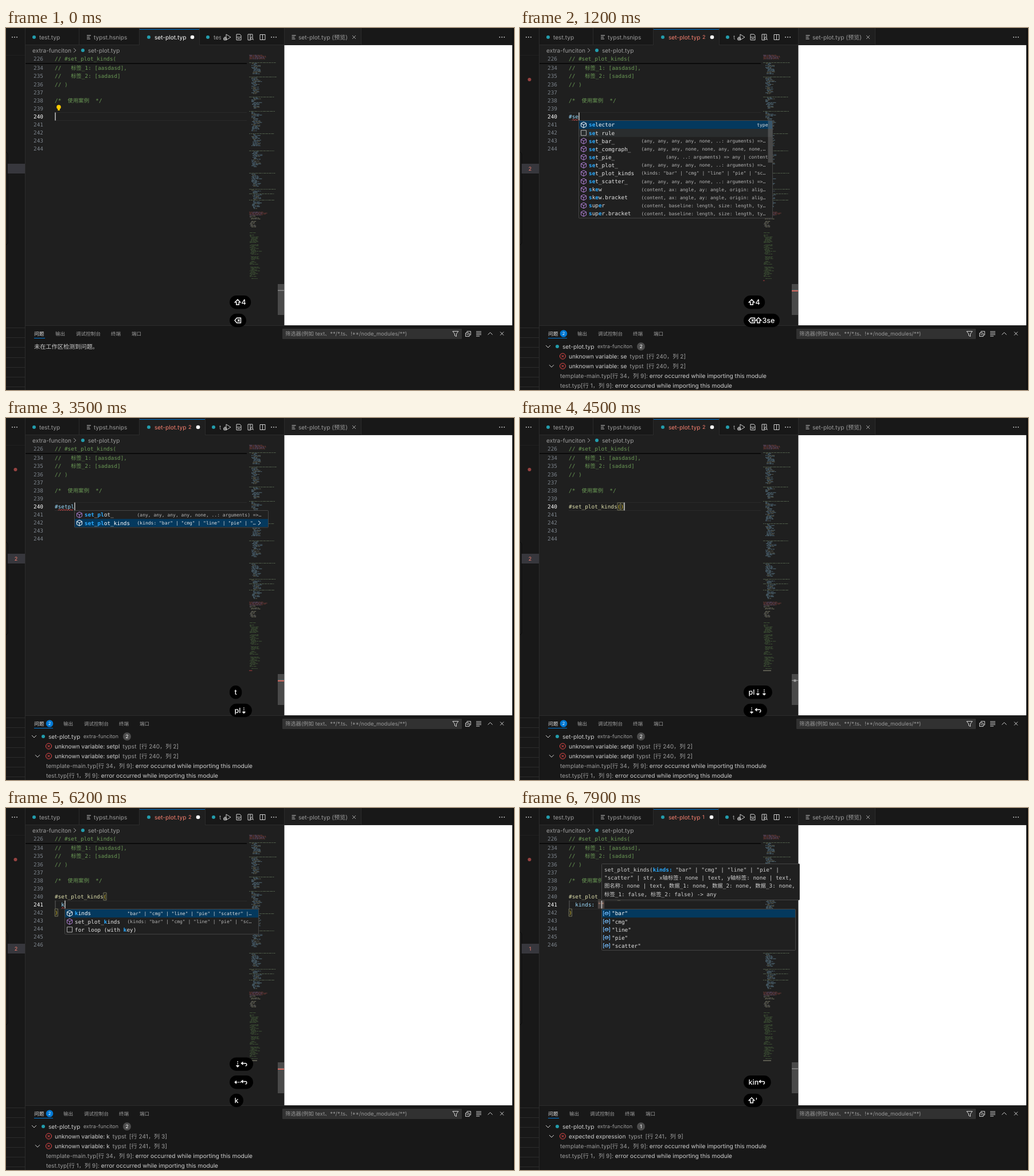
Recreate the animation shown at these times as an HTML page with a canvas. Size 886 by 632 pixels, loop 8 s.

```html
<!DOCTYPE html>
<html lang="zh-CN">
<head>
<meta charset="utf-8">
<style>
html, body { margin: 0; width: 100%; height: 100%; overflow: hidden; background: #181818; }
canvas { display: block; }
</style>
</head>
<body>
<canvas id="stage" width="886" height="632"></canvas>
<script>
const ctx = document.getElementById('stage').getContext('2d');
ctx.textRendering = 'geometricPrecision';
const LOOP = 8000, CHAR = 5.65, LEFT = 85, ROW = 14.08;
const MONO = '"DejaVu Sans Mono","Noto Sans CJK SC","Noto Sans CJK",monospace';
const SANS = 'Inter,"Noto Sans CJK SC","Noto Sans CJK",sans-serif';
const TEAL = '#239dad', RED = '#f14c4c', SALMON = '#f88070', GRAY = '#9d9d9d', LIGHT = '#d0d0d0';

// ---- drawing helpers ----
function text(s, x, cy, color, size = 10.15, family = SANS, align = 'left', weight = '') {
  ctx.font = `${weight} ${size}px ${family}`;
  ctx.textAlign = align;
  ctx.fillStyle = color;
  ctx.fillText(s, x, cy + size * 0.36);
  return x + ctx.measureText(s).width;
}
const code = (s, x, cy, color, weight) => text(s, x, cy, color, 9.4, MONO, 'left', weight);
function box(x, y, w, h, fill, stroke, radius = 0) {
  ctx.beginPath();
  ctx.roundRect(x, y, w, h, radius);
  if (fill) { ctx.fillStyle = fill; ctx.fill(); }
  if (stroke) { ctx.strokeStyle = stroke; ctx.lineWidth = 1; ctx.stroke(); }
}
function disc(x, y, r, color) {
  ctx.beginPath();
  ctx.arc(x, y, r, 0, 7);
  ctx.fillStyle = color;
  ctx.fill();
}
function icon(d, x, y, color = LIGHT, width = 1) {
  ctx.save();
  ctx.translate(x, y);
  ctx.strokeStyle = color;
  ctx.lineWidth = width;
  ctx.stroke(new Path2D(d));
  ctx.restore();
}
function dots(x, y) { for (const dx of [-4, 0, 4]) disc(x + dx, y, 0.9, LIGHT); }

const ICON = {
  lines: 'M-3.5-3H3.5M-3.5 0H1.5M-3.5 3H2.5',
  close: 'M-3-3L3 3M3-3L-3 3',
  right: 'M-2-3.5L2 0L-2 3.5',
  down: 'M-4-2L0 2L4-2',
  up: 'M-4 2L0-2L4 2',
  run: 'M-2-5L6 0L-2 5V-5M-6 1H-2V5H-6ZM-7 3H-1M-4-1V1',
  file: 'M-4-5H2L4-3V5H-4ZM-4 0H4M-2 2.5H2',
  preview: 'M-5-5H3V0M0 5H-5V-5M-1-5V5M5 5L3 3M3.5 2A2 2 0 1 1-.5 2A2 2 0 1 1 3.5 2',
  split: 'M-4.5-4.5H4.5V4.5H-4.5ZM0-4.5V4.5',
  funnel: 'M-5-4.5H5L1.5 0V4.5L-1.5 3V0Z',
  collapse: 'M-4.5-1.5H2V4.5H-4.5ZM-2-1.5V-4.5H4.5V2H2M-3 1.5H.5',
  cube: 'M0-5L4.5-2.7V2.7L0 5L-4.5 2.7V-2.7ZM-4.5-2.7L0 0L4.5-2.7M0 0V5',
  snippet: 'M-4.5-4.5H4.5V4.5H-4.5Z',
  value: 'M-4-4H-5.5V4H-4M4-4H5.5V4H4M-3-1L0-2.5L3-1.5V1L0 2.5L-3 1.5ZM-3-1L0 0L3-1.5'
};

// ---- timeline ----
const pick = (t, steps) => steps.reduce((value, [start, next]) => t >= start ? next : value, steps[0][1]);

const FIRST = [[0, ''], [100, '#'], [400, '#s'], [800, '#se'], [1900, '#set'], [2900, '#setp'], [3000, '#setpl'],
  [4300, '#set_plot_kinds()'], [5200, '#set_plot_kinds(']];
const SECOND = [[0, ''], [6100, 'k'], [6300, 'ki'], [6500, 'kin'], [6800, 'kinds: '], [7600, 'kinds: ""']];
const PROBLEMS = [[0, null], [900, ['unknown variable: se', 240, 2, 2]], [2200, ['expected identifier', 240, 5, 2]],
  [3300, ['unknown variable: setpl', 240, 2, 2]], [4700, null], [6200, ['unknown variable: k', 241, 3, 2]],
  [6700, ['unknown variable: kin', 241, 3, 2]], [7200, ['expected expression', 241, 9, 1]]];
const BUBBLES = [
  [[-300, '⇧4']],
  [[-200, '⌫'], [100, '⌫⇧3'], [400, '⌫⇧3s'], [800, '⌫⇧3se']],
  [[1900, 't']],
  [[2900, 'p'], [3000, 'pl'], [3400, 'pl⇣'], [3700, 'pl⇣⇣']],
  [[4000, '⇣'], [4300, '⇣↩']],
  [[5000, '⇠'], [5200, '⇠↩']],
  [[6100, 'k'], [6300, 'ki'], [6500, 'kin'], [6800, 'kin↩']],
  [[7500, '⇧'], [7600, "⇧'"]]
];
const PRESSES = BUBBLES.flat().map(step => step[0]);

// ---- completion lists: label, detail ----
const SIG = '(any, any, any, any, none, ..: arguments) =>…';
const KINDS = '(kinds: "bar" | "cmg" | "line" | "pie" | "sc…';
const SET_ITEMS = [['set_bar_', SIG], ['set_comgraph_', '(any, any, any, none, none, any, none, none,…'],
  ['set_pie_', '(any, ..: arguments) => any | content'], ['set_plot_', SIG], ['set_plot_kinds', KINDS], ['set_scatter_', SIG]];
const SKEW = '(content, ax: angle, ay: angle, origin: alig…';
const SUPER = '(content, baseline: length, size: length, ty…';
const STRIKE = '(content, background: bool, extent: length, …';
const LISTS = {
  s: [['selector', 'type'], ['set rule', ''], ...SET_ITEMS, ['skew', SKEW], ['skew.bracket', SKEW], ['super', SUPER], ['super.bracket', SUPER]],
  set: [['set rule', 'Sets style properties on an element.'], ...SET_ITEMS, ['selector', 'type'], ['state', 'type'],
    ['strike', STRIKE], ['strike.bracket', STRIKE], ['stroke', 'type']],
  setpl: [['set_plot_', SIG], ['set_plot_kinds', KINDS]],
  k: [['kinds', '"bar" | "cmg" | "line" | "pie" | "scatter" |…'], ['set_plot_kinds', KINDS], ['for loop (with key)', '']],
  quote: ['bar', 'cmg', 'line', 'pie', 'scatter'].map(kind => [`"${kind}"`, ''])
};
const POPUPS = [[0, ''], [500, 's'], [1900, 'set'], [2900, 'setpl'], [4300, ''], [6100, 'k'], [6800, ''], [7700, 'quote']];

function matches(label, query) {
  const find = q => {
    const found = [];
    for (let i = 0; i < label.length; i++) if (label[i] === q[found.length]) found.push(i);
    return found.length === q.length ? found : null;
  };
  const swapped = query[0] + [...query.slice(1)].reverse().join('');
  return find(query) || find(swapped) || [];
}

// ---- minimap ----
let seed = 7;
const random = () => (seed = seed * 16807 % 2147483647) / 2147483647;
const minimap = [];
const MINI_COLORS = { i: ['#c586c0', '#ce5a50'], f: ['#9cdcfe', '#7fb4d8', '#9cdcfe', '#b5b590'], g: ['#6a9955'], y: ['#b8b8b8', '#dcdcaa'] };
function miniBlock(top, bottom, kind) {
  const colors = MINI_COLORS[kind];
  for (let y = top, n = 0; y < bottom; y += 1.62, n++) {
    const head = n === 0 && kind === 'f';
    const indent = head || kind === 'i' ? n % 2 : kind === 'f' ? 4 + Math.floor(random() * 5) : 1 + Math.floor(random() * 4);
    const end = head ? 44 : kind === 'i' ? 22 + random() * 9 : indent + 3 + random() * 11;
    for (let x = indent; x < end;) {
      const w = 1.5 + random() * 4;
      minimap.push([424 + x, y, Math.min(w, 48 - x), head ? '#8fae83' : colors[Math.floor(random() * colors.length)]]);
      x += w + 0.9;
    }
  }
}
[[47, 55, 'i'], [60, 81, 'f'], [85, 115, 'f'], [120, 141, 'f'], [145, 180, 'f'], [184, 206, 'f'], [214, 242, 'f'],
  [253, 277, 'f'], [281, 288, 'f'], [289, 299, 'f'], [300, 315, 'f'], [321, 326, 'i'], [328, 333, 'y'], [337, 348, 'y'],
  [357, 358, 'g'], [361, 375, 'g'], [378, 395, 'g'], [399, 404, 'g'], [407, 412, 'g'], [417, 434, 'g'], [437, 438, 'g']]
  .forEach(block => miniBlock(...block));

// ---- parts ----
const lineY = n => 70 + (n - 234) * ROW;

function drawSidebar(problem) {
  box(0, 0, 33, 632, '#181818');
  dots(15, 16);
  box(0, 47, 33, 1, '#202020');
  box(-8, 216, 11, 163, '#1b1b1b', '#0a0a0a', 5);
  box(3, 237, 30, 17, '#37373d');
  for (let y = 523; y < 632; y += 17.2) box(0, Math.round(y), 33, 1, '#2b2b2b');
  box(33, 0, 1, 632, '#2b2b2b');
  if (!problem) return;
  disc(16.5, 90, 3, '#964341');
  text(problem[3], 17.5, 245.5, SALMON, 9, SANS, 'center');
}

function drawTabs(problem) {
  const end = problem ? (problem[3] === 2 ? 347 : 346) : 337;
  box(34, 0, 852, 30, '#181818');
  box(34, 29, 852, 1, '#2b2b2b');
  disc(49, 16, 3, TEAL);
  text('test.typ', 58, 16, GRAY);
  icon(ICON.lines, 144.5, 16, LIGHT);
  text('typst.hsnips', 153, 16, GRAY);
  for (const x of [127, 232, end]) box(x, 0, 1, 30, '#2b2b2b');
  box(233, 2, end - 233, 28, '#1f1f1f');
  box(233, 2, end - 233, 1, '#0078d4');
  disc(249, 16, 3, TEAL);
  text('set-plot.typ', 259, 16, problem ? SALMON : '#ffffff');
  if (problem) text(problem[3], 318, 16, SALMON, 9);
  disc(end - 12, 16, 3.3, '#ffffff');
  disc(end + 15, 16, 3, TEAL);
  ctx.save();
  ctx.beginPath();
  ctx.rect(end, 0, 375 - end, 29);
  ctx.clip();
  text('test', end + 25, 16, GRAY);
  ctx.restore();
  icon(ICON.run, 386, 16);
  icon(ICON.file, 406, 16);
  icon(ICON.preview, 427, 16);
  icon(ICON.split, 447.5, 16);
  dots(467, 16);

  box(485, 0, 1, 519, '#2b2b2b');
  box(486, 0, 133, 30, '#1f1f1f');
  box(619, 0, 1, 30, '#2b2b2b');
  icon(ICON.lines, 502, 16);
  text('set-plot.typ (预览)', 510, 16, GRAY);
  icon(ICON.close, 607, 16, GRAY);
  dots(865, 16);
  box(485.5, 30, 397.5, 489, '#ffffff');
  box(883, 0, 3, 632, '#111111');
}

function squiggle(x1, x2, y) {
  let d = `M${x1} ${y}`;
  for (let x = x1 + 2, up = true; x <= x2; x += 2, up = !up) d += `L${x} ${y + (up ? -2 : 0)}`;
  icon(d, 0, 0, RED, 1);
}

function drawEditor(t, problem) {
  const first = pick(t, FIRST), second = pick(t, SECOND);
  const accepted = t >= 4300, split = t >= 5200, quoted = second.endsWith('"');
  const active = split ? 241 : 240, y = lineY(active), last = split ? 246 : 244;
  box(34, 30, 451, 489, '#1f1f1f');
  text('extra-funciton', 46, 39, GRAY);
  icon(ICON.right, 120, 39, GRAY);
  disc(134, 39, 3, TEAL);
  text('set-plot.typ', 143, 39, GRAY);

  for (const edge of [-7, 7]) box(LEFT, Math.round(y + edge), 335, 1, '#2a2a2a');
  if (split) box(LEFT + 0.5, y - 7, 1, ROW, '#606060');
  const comment = (s, cy) => code(s, LEFT, cy, '#6a9955');
  comment('// #set_plot_kinds(', 54);
  comment('//   标签_1: [aasdasd],', lineY(234));
  comment('//   标签_2: [sadasd]', lineY(235));
  comment('// )', lineY(236));
  comment('/*  使用案例  */', lineY(238));
  box(34, 61, 386, 2, '#0b0b0b');
  const number = (n, cy) => text(n, 65, cy, n === active ? '#ffffff' : '#7c838b', 9.4, MONO, 'right');
  number(226, 54);
  for (let n = 234; n <= last; n++) number(n, lineY(n));

  if (t < 100) {
    disc(92, 138, 3.8, '#ffcc00');
    box(90.3, 141, 3.4, 3, '#ffcc00');
  }

  const bracket = (ch, column, cy) => {
    const x = LEFT + column * CHAR;
    box(x + 0.2, cy - 6.5, 5.2, 13, null, '#77775c');
    code(ch, x, cy, '#e0c830');
  };
  const y0 = lineY(240);
  if (accepted) {
    code('#set_plot_kinds', LEFT, y0, '#dcdcaa');
    bracket('(', 15, y0);
    split ? bracket(')', 0, lineY(242)) : bracket(')', 16, y0);
  } else {
    code(first, LEFT, y0, first === '#set' ? '#c586c0' : '#9cdcfe');
  }
  if (quoted) box(LEFT + 9 * CHAR, y - 7, 2 * CHAR, 14, '#4b4442');
  code(second.replace(/".*/, ''), LEFT + 2 * CHAR, y, '#9cdcfe');
  if (quoted) code('""', LEFT + 9 * CHAR, y, '#ce9178');

  if (problem && !accepted) {
    const missing = problem[0].startsWith('expected');
    squiggle(missing ? 104 : 91, missing ? 111 : LEFT + first.length * CHAR, y0 + 7);
  }
  if (problem && split && t < 6800) squiggle(97, LEFT + (2 + second.length) * CHAR, y + 7);

  let column = split ? 2 + second.length : first.length;
  if (t >= 5000 && !split || quoted) column--;
  const caret = LEFT + column * CHAR;
  const pressed = Math.max(...PRESSES.filter(p => p <= t));
  if ((t - pressed) % 1000 < 550) box(caret + 0.3, y - 7, 1.4, 14, '#d0d0d0');

  ctx.globalAlpha = 0.42;
  for (const [mx, my, w, color] of minimap) box(mx, my, w, 1, color);
  ctx.globalAlpha = 0.7;
  if (first) box(424, 440.5, Math.min(first.length * 0.9, 14), 1, problem && !accepted ? RED : '#c8c8a8');
  ctx.globalAlpha = 1;
  const thumb = split ? 444 : 447;
  box(474, thumb, 11, 54, '#4a4a4a');
  box(474, thumb + 10.5, 11, 1.5, '#8a8a8a');
  if (problem && t < 7200 && (!accepted || split)) box(474, thumb + 11, 11, 2, '#d0655c');
  if (accepted && !split) box(477.5, 456.5, 4, 4, '#a0a0a0');
  return { caret, y };
}

function drawPanel(problem) {
  box(34, 519, 849, 113, '#181818');
  box(34, 519, 849, 1, '#2b2b2b');
  const badge = problem && problem[3] > 1, shift = badge ? 14 : 0;
  text('问题', 49, 533.5, '#e7e7e7', 8.7);
  box(49, 541, badge ? 33 : 19, 1, '#0078d4');
  if (badge) {
    disc(76, 533.5, 6.3, '#0078d4');
    text(problem[3], 76, 533.5, '#ffffff', 7.5, SANS, 'center');
  }
  [['输出', 86], ['调试控制台', 122], ['终端', 183], ['端口', 219]].forEach(([s, x]) => text(s, x + shift, 533.5, GRAY, 8.6));
  box(482, 525, 313, 18, '#313131', null, 1);
  text('筛选器(例如 text、**/*.ts、!**/node_modules/**)', 487, 534, '#989898', 9.3);
  icon(ICON.funnel, 784, 534);
  icon(ICON.collapse, 806, 534);
  icon('M-5-4H4M-5-1.3H4M-5 1.3H4M-5 4H1', 825, 534);
  icon(ICON.up, 844.5, 533.5);
  icon(ICON.close, 865, 533.5);

  if (!problem) {
    text('未在工作区检测到问题。', 49, 556, LIGHT, 10.2);
    return;
  }
  const [message, row, column, count] = problem;
  icon(ICON.down, 49, 556);
  disc(65, 556, 3, TEAL);
  text('set-plot.typ', 74, 556, LIGHT);
  text('extra-funciton', 135, 556, GRAY, 9.1);
  disc(211, 556, 7, '#4d4d4d');
  text(count, 211, 556, '#ffffff', 8.5, SANS, 'center');
  let y = 573;
  for (let i = 0; i < count; i++, y += 17.2) {
    icon('M5 0A5 5 0 1 1-5 0A5 5 0 1 1 5 0M-2-2L2 2M2-2L-2 2', 74.5, y, RED);
    if (i === count - 1) icon(ICON.down, 55, y);
    let x = text(message, 85, y, LIGHT);
    x = text('typst', x + 5, y, GRAY);
    text(`[行 ${row}，列 ${column}]`, x + 5, y, GRAY);
  }
  for (const place of ['template-main.typ[行 34，列 9]:', 'test.typ[行 1，列 9]:']) {
    const x = text(place, 70, y, GRAY);
    text('error occurred while importing this module', x + 3, y, LIGHT);
    y += 17.2;
  }
}

function drawPopup(t, caret, lineCenter) {
  const name = pick(t, POPUPS);
  if (!name) return;
  const items = LISTS[name], x = Math.round(caret) + 0.5, top = Math.round(lineCenter + 8) - 0.5;
  const query = name === 'quote' ? '' : name === 'k' ? pick(t, SECOND) : pick(t, FIRST).slice(1);
  const selected = name === 'setpl' ? pick(t, [[0, 0], [3400, 1], [3700, 0], [4000, 1]]) : 0;
  const shown = name === 'k' && query.length > 1 ? items.slice(0, 2) : items;
  box(x, top, 338, shown.length * ROW + 1.5, '#202020', '#454545', 1);
  shown.forEach(([label, detail], i) => {
    const cy = top + 7.6 + i * ROW, on = i === selected;
    if (on) box(x + 0.5, cy - 7, 337, ROW, '#04395e');
    else if (Math.abs(cy - 183) < 3) box(x + 0.5, cy - 7, 337, ROW, '#2a2d2e');
    const shape = name === 'quote' ? 'value' : label.includes(' ') ? 'snippet' : 'cube';
    icon(ICON[shape], x + 8.5, cy, on && shape !== 'value' ? '#ffffff' : { value: '#75beff', snippet: '#b0b0b0', cube: '#b180d7' }[shape]);
    const hits = query ? matches(label, query) : [];
    [...label].forEach((ch, k) => {
      const hit = hits.includes(k);
      code(ch, x + 17.5 + k * CHAR, cy, hit ? '#2aaaff' : on ? '#ffffff' : '#e4e4e4', hit ? 'bold' : '');
    });
    if (name === 'setpl' && on && i === 1) {
      detail = detail.replace('sc…', '…');
      icon(ICON.right, x + 322.5, cy, '#ffffff');
    }
    const color = on ? '#e0e0e0' : '#b5b5b5';
    detail.endsWith('…') ? text(detail, x + 109, cy, color, 8, MONO) : text(detail, x + 330, cy, color, 8, MONO, 'right');
  });
  if (shown.length > 10) box(x + 330, top + 0.5, 7.5, name === 'set' ? 97 : 73, 'rgba(121,121,121,.45)');
  if (name === 'quote') drawSignature();
}

function drawSignature() {
  box(142.5, 97.5, 345, 63, '#202020', '#454545', 1);
  let x = code('set_plot_kinds(', 147, 108, LIGHT);
  x = code('kinds:', x, 108, '#2aaaff', 'bold');
  code(' "bar" | "cmg" | "line" | "pie" |', x, 108, LIGHT);
  ['"scatter" | str, x轴标签: none | text, y轴标签: none | text,',
    '图名称: none | text, 数据_1: none, 数据_2: none, 数据_3: none,',
    '标签_1: false, 标签_2: false) -> any'].forEach((s, i) => code(s, 147, 122 + i * ROW, LIGHT));
}

// Key glyphs: [advance, outline]
const KEYS = {
  '⇧': [12, 'M5.5-4.8L10.2 0H7.8V4.2H3.2V0H.8Z'],
  '⌫': [12, 'M.5 0L4-4.2H11V4.2H4ZM5.5-2L9 2M9-2L5.5 2'],
  '⇣': [11, 'M5.5-5V-3.4M5.5-2V-.4M5.5 1V4.5M3 2.2L5.5 4.8L8 2.2'],
  '⇠': [11, 'M11 0H9.4M8 0H6.4M5 0H1M3.4-2.5L.8 0L3.4 2.5'],
  '↩': [13, 'M4-3.8L1-1.3L4 1.2M1-1.3H9A2.4 2.4 0 0 1 9 3H8']
};
function drawBubbles(t) {
  const born = BUBBLES.filter(steps => steps[0][0] <= t).reverse();
  born.forEach((steps, i) => {
    const idle = t - steps[steps.length - 1][0];
    ctx.globalAlpha = Math.max(0, Math.min(1, 1 - (idle - 2000) / 300));
    if (!ctx.globalAlpha) return;
    const label = pick(t, steps), cy = 510.5 - 31.7 * i;
    ctx.font = `500 12.5px ${SANS}`;
    const parts = label.match(/[⇧⌫⇣⇠↩]|[^⇧⌫⇣⇠↩]+/g);
    const width = parts.reduce((sum, part) => sum + (KEYS[part] ? KEYS[part][0] : ctx.measureText(part).width), 17);
    box(390, cy - 11.7, width, 23.4, '#000000', null, Math.min(11.7, width / 2));
    let x = 398.5;
    for (const part of parts) {
      if (KEYS[part]) {
        icon(KEYS[part][1], x, cy, '#ffffff', 1.4);
        x += KEYS[part][0];
      } else x = text(part, x, cy, '#ffffff', 12.5, SANS, 'left', '500');
    }
  });
  ctx.globalAlpha = 1;
}

function draw(t) {
  const problem = pick(t, PROBLEMS);
  drawSidebar(problem);
  const { caret, y } = drawEditor(t, problem);
  drawTabs(problem);
  drawPanel(problem);
  drawPopup(t, caret, y);
  drawBubbles(t);
}

const start = performance.now();
function tick() {
  draw(Math.max(0, performance.now() - start) % LOOP);
  requestAnimationFrame(tick);
}
tick();
</script>
</body>
</html>
```
